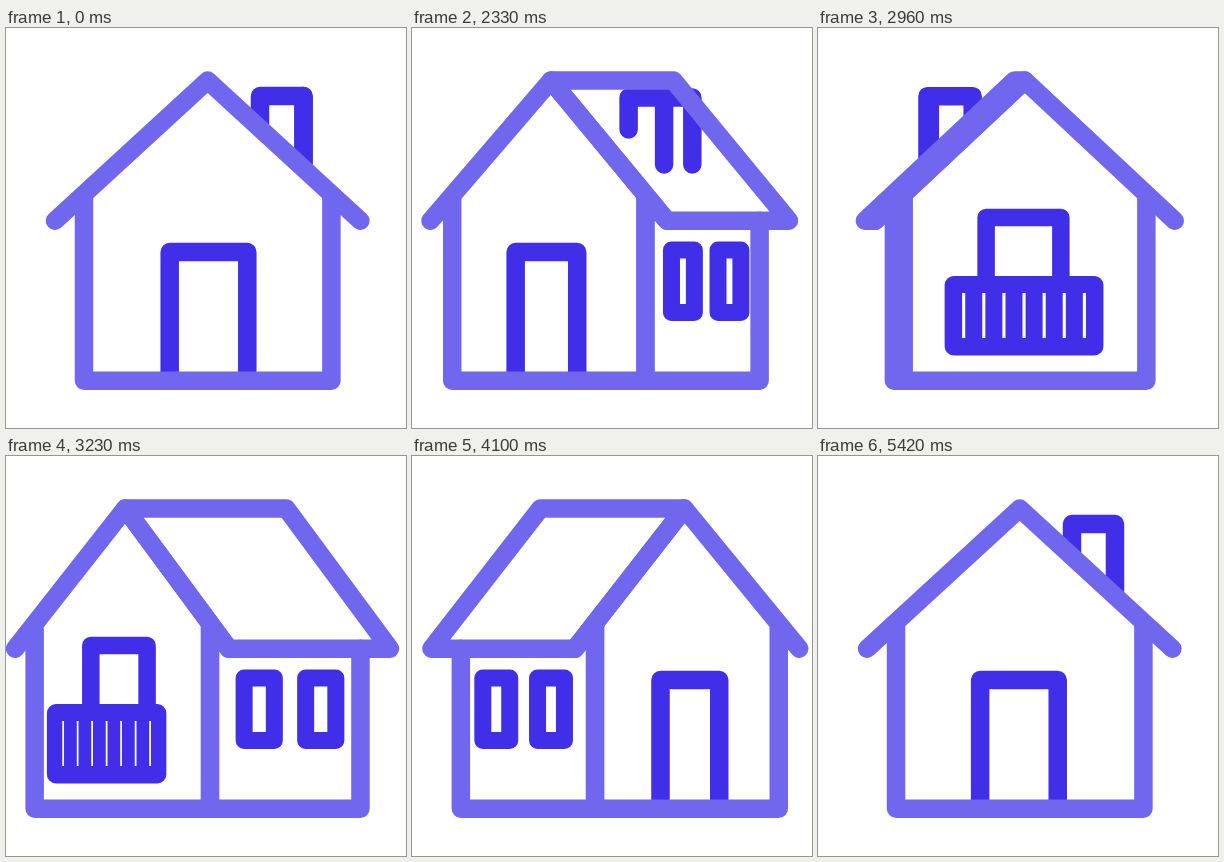
Animation, 400 px wide and 400 px high, one loop 5.45 s. Source, as an HTML page with a canvas:

```html
<!DOCTYPE html>
<html lang="en">
<head>
<meta charset="utf-8">
<title>Turning house</title>
<style>
  html, body { margin: 0; width: 100%; height: 100%; overflow: hidden; background: #fff; }
  canvas { display: block; width: 400px; height: 400px; }
</style>
</head>
<body>
<canvas id="stage" width="400" height="400"></canvas>
<script>
const ctx = document.getElementById('stage').getContext('2d');
const LIGHT = '#7067ee', DARK = '#402ee8', WHITE = '#fff';
const LOOP = 5450, START = 2000, FIRST = 2030, TURN = 3450, STEP = 30;
const RIDGE = 52.5, EAVE = 192.7, BASE = 352.7, LINE = 18.5;

const lerp = (a, b, t) => a + (b - a) * t;

// value at bend k: 0 gable faces us, 1 corner view, 2 side view
const bend = (k, a, b, c) => k < 1 ? lerp(a, b, k) : lerp(b, c, k - 1);

const bez = (u, a, b) => 3 * a * u * (1 - u) ** 2 + 3 * b * u * u * (1 - u) + u ** 3;

function ease(x) {
  if (x <= 0 || x >= 1) return x <= 0 ? 0 : 1;
  let lo = 0, hi = 1;
  for (let i = 0; i < 30; i++) {
    const mid = (lo + hi) / 2;
    if (bez(mid, 0.18, 0.24) < x) lo = mid; else hi = mid;
  }
  return bez(lo, 0, 1);
}

function trace(points, closed) {
  ctx.beginPath();
  for (const [x, y] of points) ctx.lineTo(x, y);
  if (closed) ctx.closePath();
}

function line(points, color, width = LINE, closed = false) {
  trace(points, closed);
  ctx.strokeStyle = color;
  ctx.lineWidth = width;
  ctx.stroke();
}

function fill(points, color = WHITE) {
  trace(points, true);
  ctx.fillStyle = color;
  ctx.fill();
}

// keep later drawing outside the shape
function mask(points) {
  trace(points, true);
  ctx.rect(0, 0, 400, 400);
  ctx.clip('evenodd');
}

const box = (l, t, r, b) => [[l, t], [r, t], [r, b], [l, b]];

function solidBox(l, r) {
  const shape = box(l, 257, r, 318.5);
  fill(shape, DARK);
  line(shape, DARK, 18, true);
}

function railing(l, r) {
  solidBox(l, r);
  const gap = (r - l) / 7;
  const slit = gap - Math.min(17, gap * 0.88);
  ctx.fillStyle = WHITE;
  for (let i = 0; i < 7; i++) {
    ctx.fillRect(l + gap * (i + 0.5) - slit / 2, 265, slit, 45);
  }
}

function draw(pos) {
  const half = pos % 4;
  const k = half < 2 ? half : 4 - half;
  const flip = half >= 2;
  const front = pos < 2 || pos >= 6;
  const chimneySide = pos < 4;
  const sideSeen = k > 0.02;
  const axis = bend(k, 201.7, 200, 201.5);
  const X = (a, b, c) => {
    const x = bend(k, a, b, c);
    return flip ? 2 * axis - x : x;
  };

  const apex = X(201.7, 119.5, 76), rear = X(201.7, 280, 326.5);
  const eaveFar = X(49, 9, 27), eaveNear = X(354.4, 224, 27), eaveRear = X(354.4, 384, 376.3);
  const wallFar = X(78, 28.5, 52.5), wallNear = X(325.4, 205, 52), wallRear = X(325.4, 354.5, 347.5);
  const topFar = bend(k, 168, 173, 182), topNear = bend(k, 168, 168, EAVE);
  const roof = [[apex, RIDGE], [rear, RIDGE], [eaveRear, EAVE], [eaveNear, EAVE]];
  const gable = [[wallFar, topFar], [apex, RIDGE], [wallNear, topNear], [wallNear, BASE], [wallFar, BASE]];
  const chTop = bend(k, 68, 70, 87.5), chFoot = bend(k, 135, 137, 137);

  ctx.fillStyle = WHITE;
  ctx.fillRect(0, 0, 400, 400);
  ctx.lineCap = ctx.lineJoin = 'round';

  // parts behind the house
  if (!chimneySide) {
    const l = X(106.4, 145, 172), r = X(149.4, 175, 233);
    line([[l, chFoot], [l, chTop], [r, chTop], [r, chFoot]], DARK);
  }
  if (front && k > 1) {
    const edge = X(300, 352, 368), inner = X(290, 344, 359);
    solidBox(Math.min(edge, inner), Math.max(edge, inner));
  }

  // gable end
  fill(gable);
  if (front) {
    const l = X(163.7, 85, 62.5), r = X(241.3, 141.6, 62.5);
    line([[l, BASE - 4], [l, 224], [r, 224], [r, BASE - 4]], DARK);
  }
  line([[wallFar, topFar], [wallFar, BASE], [wallNear, BASE], [wallNear, topNear]], LIGHT);
  if (!front) {
    const l = X(165.5, 85, 52.5), r = X(241.5, 141.6, 52.5);
    line([[l, 258], [l, 189.5], [r, 189.5], [r, 258]], DARK, 17.5);
    const p = X(132, 50, 34), q = X(275.5, 152, 44);
    railing(Math.min(p, q), Math.max(p, q));
  }

  if (sideSeen) fill(roof);
  if (chimneySide) {
    const off = flip ? bend(k, 2.5, 0, 0) : 0;
    const a = X(254, 205, 172) + off, b = X(297.5, 238, 172) + off, c = X(297.5, 275, 233.4) + off;
    ctx.save();
    mask(gable);
    line([[a, bend(k, 100, 102, 97)], [a, chTop], [b, chTop], [b, chFoot]], DARK);
    line([[b, chTop], [c, chTop], [c, chFoot]], DARK);
    ctx.restore();
  }

  // long side
  if (sideSeen) {
    fill(box(wallNear, EAVE, wallRear, BASE));
    const pane = (l, r) => line(box(l, 222, r, 284.5), DARK, 17, true);
    pane(X(325.4, 239, 94), X(325.4, 269, 157));
    pane(X(325.4, 300, 242), X(325.4, 330, 305));
    line([[wallNear, topNear], [wallNear, BASE], [wallRear, BASE], [wallRear, EAVE]], LIGHT);
    line(roof, LIGHT, LINE, true);
  }
  line([[eaveFar, EAVE], [apex, RIDGE], [eaveNear, EAVE]], LIGHT);
}

function frame(now) {
  const t = now % LOOP;
  let pos = 0;
  if (t >= FIRST) {
    const held = FIRST + STEP * Math.floor((t - FIRST) / STEP);
    pos = 8 * ease((held - START) / TURN) % 8;
  }
  draw(pos);
}

let origin = null;
function tick(now) {
  if (origin === null) origin = now;
  frame(now - origin);
  requestAnimationFrame(tick);
}
frame(0);
requestAnimationFrame(tick);
</script>
</body>
</html>
```
